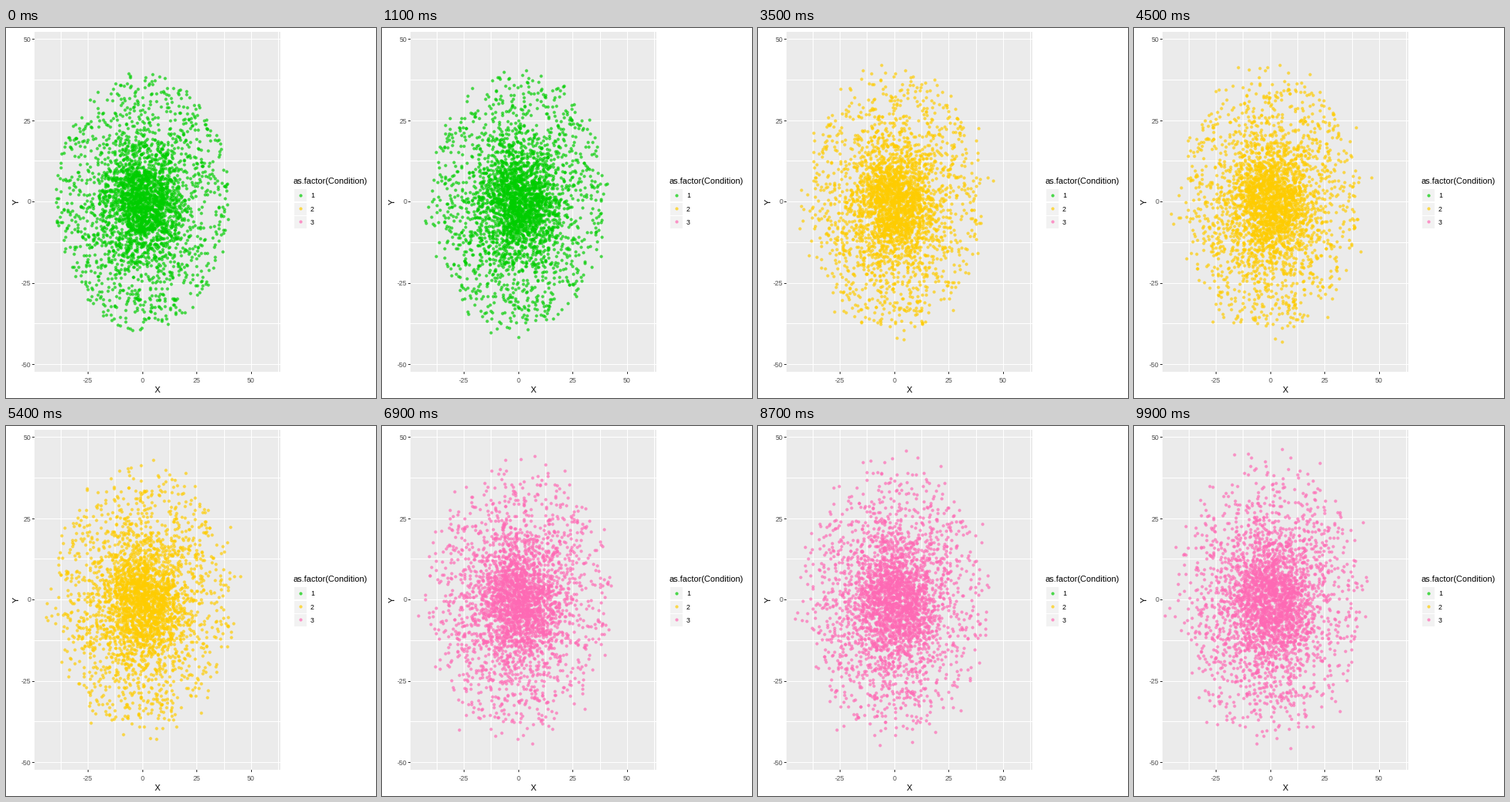
Write a matplotlib script that moves like this. It is 480 px wide and 480 px high and loops after 10 s.

```python
import numpy as np
import matplotlib.pyplot as plt
from matplotlib.animation import FuncAnimation
from matplotlib.patches import Rectangle

SIZE, DPI = 480, 72
FRAMES, INTERVAL = 100, 100
PER_RING = 1000
STEP = 0.45
COLORS = ["#00cd00", "#ffcc00", "#ff69b4"]
ALPHA = 0.6

plt.rcParams["font.family"] = "Liberation Sans"


def px(x):
    return 176.75 + 2.825 * np.asarray(x)


def py(y):
    return 225.1 - 4.22 * np.asarray(y)


def random_walks(rng):
    """A filled disc and two rings of particles, each taking small random steps."""
    radius = np.concatenate([10 * np.sqrt(rng.uniform(0, 1, PER_RING)),
                             rng.uniform(10, 20, PER_RING),
                             rng.uniform(20, 40, PER_RING)])
    angle = rng.uniform(0, 2 * np.pi, radius.size)
    start = np.stack([radius * np.cos(angle), radius * np.sin(angle)], axis=1)
    steps = rng.normal(0, STEP, (FRAMES, radius.size, 2))
    steps[0] = 0
    return start + np.cumsum(steps, axis=0)


cloud = random_walks(np.random.default_rng(12))

fig = plt.figure(figsize=(SIZE / DPI, SIZE / DPI), dpi=DPI, facecolor="white")
ax = fig.add_axes([0, 0, 1, 1])
ax.set(xlim=(0, SIZE), ylim=(SIZE, 0))
ax.axis("off")


def rect(x, y, w, h, color):
    ax.add_patch(Rectangle((x, y), w, h, fc=color, lw=0, zorder=0, antialiased=False))


def label(x, y, s, size=8.8, color="#4d4d4d", ha="center", va="center_baseline", **kw):
    ax.text(x, y, s, size=size, color=color, ha=ha, va=va, **kw)


def dots(x, y, color):
    line, = ax.plot(x, y, "o", ms=3.2, mew=1, mfc=color, mec=color,
                    alpha=ALPHA, antialiased=False)
    return line


# panel, grid and axes
LEFT, TOP, RIGHT, BOTTOM = 37, 5, 356, 446
rect(LEFT, TOP, RIGHT - LEFT, BOTTOM - TOP, "#ebebeb")
for v in np.arange(-37.5, 63, 12.5):
    x = round(float(px(v)))
    rect(x, TOP, 1, BOTTOM - TOP, "white")
    if v % 25 == 0:
        rect(x, BOTTOM, 1, 3, "#333333")
        label(x, 456.5, f"{v:.0f}")
for v in np.arange(-50, 51, 12.5):
    y = round(float(py(v)))
    rect(LEFT, y, RIGHT - LEFT, 1, "white")
    if v % 25 == 0:
        rect(LEFT - 3, y, 3, 1, "#333333")
        label(32, y, f"{v:.0f}", ha="right")
label(196.5, 469, "X", 11, "black")
label(13.5, 225.5, "Y", 11, "black", va="center", rotation=90)

# legend
label(372.5, 201.5, "as.factor(Condition)", 11, "black", ha="left", va="baseline")
for i, color in enumerate(COLORS):
    y = 208.5 + 17.28 * i
    rect(374, round(y) + 1, 16, 16, "#f2f2f2")
    dots([381.5], [y + 8.2], color)
    label(395, y + 8.5, f"{i + 1}", color="black", ha="left")

points = dots([], [], COLORS[0])


def update(i):
    color = COLORS[min(i // 33, 2)]
    points.set_data(px(cloud[i, :, 0]), py(cloud[i, :, 1]))
    points.set_markerfacecolor(color)
    points.set_markeredgecolor(color)
    return (points,)


anim = FuncAnimation(fig, update, frames=FRAMES, interval=INTERVAL,
                     repeat=True, repeat_delay=0, blit=False)
plt.show()
```
